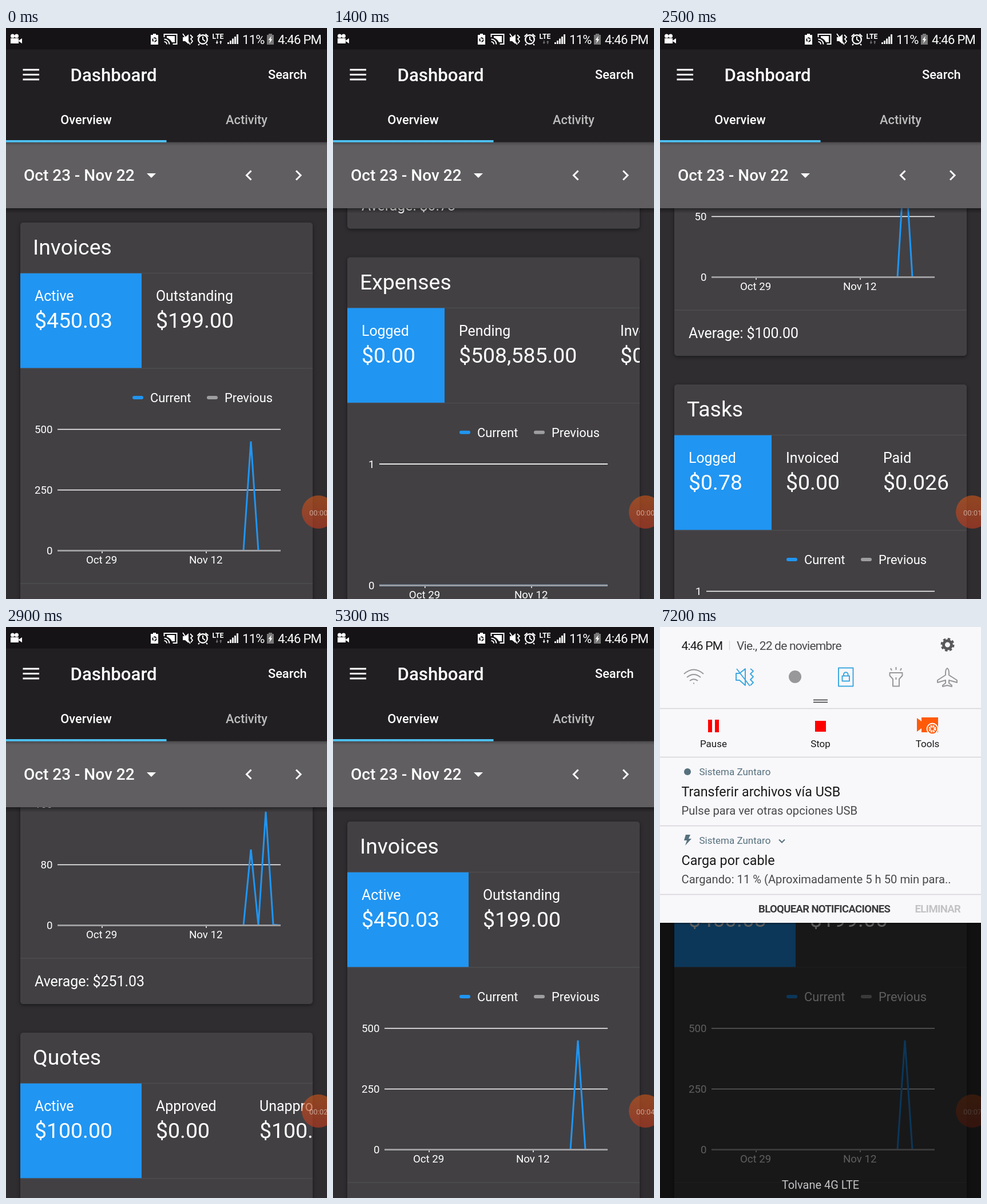
Write an HTML page that moves like this. It is 561 by 998 pixels and loops after 8 s.

```html
<!DOCTYPE html>
<html lang="en">
<meta charset="utf-8">
<title>Dashboard</title>
<style>
  html, body { margin: 0; width: 100%; height: 100%; overflow: hidden; background: #2f2e31 }
  svg { display: block }
  text { font-family: Roboto, sans-serif; fill: #fff }
  .medium { font-weight: 500 }
  .mid { text-anchor: middle }
  .end { text-anchor: end }
  .line { fill: none; stroke: #fff; stroke-width: 3 }
  .card { fill: #424043; filter: drop-shadow(0 2px 3px #0007) }
  .rule { stroke: #4d4c4f; stroke-width: 1.3 }
  .narrow { letter-spacing: -.7px }
  .icons { fill: none; stroke: #98979a; stroke-width: 2; stroke-linejoin: round }
  .icons .on { stroke: #3fa9e0 }
  #panel text { fill: #1a1a1a }
  #panel .app { fill: #56717d; font-size: 17px }
  #panel .head { font-size: 23.3px }
  #panel .info { fill: #49484b; font-size: 20.2px }
  #panel .button { font-size: 18.5px; font-weight: 700; letter-spacing: -.65px }
  .paper { fill: #f8f7fa }
  .split { stroke: #d5d4d7; stroke-width: 1.3 }
</style>
<svg id="stage" width="561" height="998" viewBox="0 0 561 998">
  <defs>
    <linearGradient id="shade" x2="0" y2="1">
      <stop stop-opacity=".4"/><stop offset="1" stop-opacity="0"/>
    </linearGradient>
    <linearGradient id="ember" x2="0" y2="1">
      <stop stop-color="#c0531a"/><stop offset="1" stop-color="#b53a22"/>
    </linearGradient>
    <clipPath id="window"><rect id="opening" width="561" height="467"/></clipPath>
  </defs>
  <rect width="561" height="998" fill="#2f2d30"/>
  <g id="list"></g>

  <!-- date bar -->
  <rect y="315" width="561" height="9" fill="url(#shade)"/>
  <rect y="199" width="561" height="116" fill="#605e61"/>
  <rect y="199" width="561" height="7" fill="url(#shade)" opacity=".6"/>
  <text class="medium" x="31" y="267" font-size="28">Oct 23 - Nov 22</text>
  <path d="M246 254h16l-8 8z" fill="#fff"/>
  <path class="line" d="M428.5 249.5l-8 8 8 8M507 249.5l8 8-8 8"/>

  <!-- app bar -->
  <rect width="561" height="199.5" fill="#211f22"/>
  <rect y="196" width="280.5" height="3.8" fill="#4fc3f7"/>
  <path class="line" d="M29.5 73H58M29.5 81.5H58M29.5 90H58"/>
  <text class="medium" x="112.5" y="92.5" font-size="31.2">Dashboard</text>
  <g class="medium" font-size="21.8">
    <text x="458" y="89">Search</text>
    <text class="mid" x="140" y="168">Overview</text>
    <text class="mid" x="420.5" y="168" opacity=".7">Activity</text>
  </g>

  <!-- status bar -->
  <rect width="561" height="37.5" fill="#151316"/>
  <g fill="#fff">
    <path d="M8 18h14v9H8zM22 22l6-4v9l-6-4z"/>
    <circle cx="11.5" cy="14" r="3.5"/><circle cx="18.5" cy="14" r="3.5"/>
    <path d="M253 12h4v-2h5v2h4v17h-13z"/>
    <circle cx="259.5" cy="20.5" r="3.2" fill="none" stroke="#151316" stroke-width="2" stroke-dasharray="5 1.7"/>
    <path d="M281 14h14v11h-5q-3-6-9-8z"/>
    <path d="M276.5 16v-5h22v17h-7M276.5 19.5a9 9 0 0 1 9 9M276.5 24a4.5 4.5 0 0 1 4.5 4.5" fill="none" stroke="#fff" stroke-width="2"/>
    <path d="M309 16h4l6-5v17l-6-5h-4z"/>
    <path d="M309 10l13 19M322 12l4 4-3 3 3 4-3 4" fill="none" stroke="#fff" stroke-width="1.8"/>
    <path d="M344 15v5l4 3M334.5 15l5-4.5M353.5 15l-5-4.5M338 28l-2 2M350 28l2 2" fill="none" stroke="#fff" stroke-width="2"/>
    <circle cx="344" cy="20" r="7.8" fill="none" stroke="#fff" stroke-width="2.4"/>
    <path id="arrows" d="M368 22h1.5v3h1.5l-2.3 3-2.2-3h1.5zM374.5 28h1.5v-3h1.5l-2.3-3-2.2 3h1.5z"/>
    <path d="M388.5 28v-3M392.5 28v-6M396.5 28v-9.5M400.5 28v-13M404.5 28v-17" stroke="#fff" stroke-width="2.8"/>
    <path d="M456 12h3v-2h6v2h3v17h-12z" fill="#777"/>
    <path d="M464 14l-5.5 7h3l-1.5 6 5.5-7.5h-3z"/>
  </g>
  <text x="360.5" y="19" font-size="12.2" font-weight="700">LTE</text>
  <g class="narrow" font-size="22"><text x="413" y="28">11%</text><text x="475" y="28">4:46 PM</text></g>

  <!-- recording timer -->
  <circle cx="546" cy="846" r="29" fill="url(#ember)" fill-opacity=".68"/>
  <text id="timer" x="530" y="851.5" font-size="13" opacity=".5"></text>

  <rect id="dim" width="561" height="998"/>
  <g id="panel">
    <text class="mid" x="280.5" y="982" font-size="20" style="fill:#c4c3c5">Tolvane 4G LTE</text>
    <g clip-path="url(#window)">
      <g id="notes">
        <rect class="paper" width="561" height="560"/>
        <circle cx="48" cy="253" r="6" fill="#56717d"/>
        <text class="app" x="68.5" y="259">Sistema Zuntaro</text>
        <text class="head" x="37.5" y="296">Transferir archivos vía USB</text>
        <text class="info" x="37.5" y="327.5">Pulse para ver otras opciones USB</text>
        <path class="split" d="M0 347.5h561"/>
        <path d="M45 363h8l-3 7h5l-11 12 3-9h-5z" fill="#56717d"/>
        <text class="app" x="68.5" y="379">Sistema Zuntaro</text>
        <path d="M208 371.5l5 5 5-5" fill="none" stroke="#56717d" stroke-width="2"/>
        <text class="head" x="37.5" y="416">Carga por cable</text>
        <text class="info" x="37.5" y="447.5">Cargando: 11 % (Aproximadamente 5 h 50 min para..</text>
      </g>
    </g>
    <g id="footer">
      <rect y="517" width="561" height="4" fill="url(#shade)"/>
      <rect class="paper" y="467" width="561" height="50"/>
      <path class="split" d="M0 467.5h561"/>
      <text class="button" x="172" y="499" style="fill:#3c3b3e">BLOQUEAR NOTIFICACIONES</text>
      <text class="button" x="445.5" y="499" style="fill:#c3c2c5">ELIMINAR</text>
    </g>
    <g id="header">
      <rect id="edge" y="227" width="561" height="6" fill="url(#shade)"/>
      <rect class="paper" width="561" height="227"/>
      <path class="split" d="M0 142.5h561M0 227.5h561M121.5 24v16"/>
      <g font-size="21" letter-spacing="-.8">
        <text x="37.5" y="40">4:46 PM</text>
        <text x="134" y="40" style="fill:#49484b">Vie., 22 de noviembre</text>
      </g>
      <g fill="none" stroke="#58575a">
        <circle cx="502.5" cy="31" r="7" stroke-width="5"/>
        <circle cx="502.5" cy="31" r="10.5" stroke-width="3" stroke-dasharray="4.5 3.747"/>
      </g>
      <g class="icons">
        <path d="M42 82q17-15 34 0M47 88q12-10 24 0M52 94q7-5.5 14 0M58 98.5h2"/>
        <path class="on" d="M133 81h6l10-8v29l-10-9h-6zM134 73l23 30M158 73l5 4-5 5 5 5-5 5 5 5-5 5"/>
        <circle cx="236" cy="87" r="11" fill="#98979a" stroke="none"/>
        <path class="on" d="M312 71.5h25.5v32H312zM318.5 85.5h12.5v9h-12.5zM321 85v-2a3.8 3.8 0 0 1 7.6 0v2"/>
        <path d="M401.5 80h22v5l-5.5 6v12.5h-11V91l-5.5-6zM412.5 70v5M403 72l2 4M422 72l-2 4M412.5 88v4"/>
        <path d="M502 72q-3 2-3 8v4l-14 9v4l14-4v5l-5 4v2l8-2 8 2v-2l-5-4v-5l14 4v-4l-14-9v-4q0-6-3-8z"/>
        <path d="M268 127.500h25M268 131.500h25" stroke="#333" stroke-width="1.5"/>
      </g>
      <path d="M84 162h7v22h-7zM96 162h7v22h-7zM271 164h19v19h-19z" fill="red"/>
      <path d="M449 159l8 6v-7h29v26h-29v-7l-8 6z" fill="#ff5a0a"/>
      <circle cx="476" cy="178" r="9.5" fill="#ff5a0a" stroke="#fff" stroke-width="1.8"/>
      <circle cx="476" cy="178" r="4.5" fill="none" stroke="#fff" stroke-width="4" stroke-dasharray="2.4 1.134"/>
      <g class="mid" font-size="17">
        <text x="93.5" y="210">Pause</text><text x="280.5" y="210">Stop</text><text x="467.5" y="210">Tools</text>
      </g>
    </g>
  </g>
</svg>
<script>
const $ = id => document.getElementById(id);
const clamp = v => Math.max(0, Math.min(1, v));
const text = (x, y, size, str, cls = '') =>
  `<text x="${x}" y="${y}" font-size="${size}" class="${cls}">${str}</text>`;
const rule = y => `<path class="rule" d="M25 ${y}h511"/>`;

// tiles: [left, label, amount]; peaks: [day, share of the top grid line]; born: start of the chart's entrance
const cards = [
  { name: 'Invoices', average: '$450.03', axis: ['500', '250'], peaks: [[26, .9]],
    tiles: [[25, 'Active', '$450.03'], [237, 'Outstanding', '$199.00']] },
  { name: 'Payments', average: '$251.03', axis: ['160', '80'], peaks: [[26, .625], [28, .9375], [29, .006]],
    tiles: [[25, 'Active', '$251.03'], [237, 'Refunded', '$0.00']] },
  { name: 'Quotes', average: '$100.00', axis: ['100', '50'], peaks: [[26, 1]], born: 760,
    tiles: [[25, 'Active', '$100.00'], [237, 'Approved', '$0.00'], [418, 'Unapproved', '$100.00']] },
  { name: 'Tasks', average: '$0.78', axis: ['1'], left: 81, peaks: [[28, .59], [29, .19]], born: 1000,
    tiles: [[25, 'Logged', '$0.78'], [195, 'Invoiced', '$0.00'], [365, 'Paid', '$0.026']] },
  { name: 'Expenses', average: '$0.00', axis: ['1'], left: 81, peaks: [],
    tiles: [[25, 'Logged', '$0.00'], [195, 'Pending', '$508,585.00'], [477, 'Invoiced', '$0.00']] },
];

function cardMarkup({ name, average, axis, tiles, left = 90 }, i) {
  const dayX = day => left + day * (480 - left) / 30;
  const grid = [...axis, '0'].map((label, k) => {
    const y = 361.5 + 212 * k / axis.length;
    return `<path d="M${left} ${y}H480" stroke="#fff" stroke-width="1.6"/>` + text(left - 8.5, y + 6.5, 18.7, label, 'end');
  }).join('');
  const dates = [[6, 'Oct 29'], [20, 'Nov 12']].map(([day, label]) =>
    `<path d="M${dayX(day)} 573v5" stroke="#fff" stroke-width="1.5"/>` + text(dayX(day) - .8, 596, 18.7, label, 'mid')).join('');
  const labels = tiles.map(([x, label, amount]) =>
    text(x + 25, 137, 24.9, label) + text(x + 25, 184, 37.4, amount)).join('');
  return `<g transform="translate(0 ${340 + 761 * i})">
    <rect class="card" x="25" width="511" height="711" rx="5"/>
    ${text(47, 56.2, 37.4, name)}${rule(88.5)}${rule(255)}${rule(631)}
    <rect x="25" y="88.8" width="${tiles[1][0] - 25}" height="165.4" fill="#2095f2"/>
    <svg width="536" height="255">${labels}</svg>
    <rect x="221" y="303" width="19" height="6" rx="3" fill="#2095f2"/>${text(252, 314, 21.8, 'Current')}
    <rect x="351" y="303" width="19" height="6" rx="3" fill="#9e9d9f"/>${text(382, 314, 21.8, 'Previous')}
    ${grid}${dates}
    <svg width="536" height="581.5" fill="none" stroke-width="3">
      <path id="current${i}" stroke="#2095f2"/><path id="previous${i}" stroke="#9e9d9f"/>
    </svg>
    ${text(50, 679.5, 24.9, 'Average: ' + average)}
  </g>`;
}
$('list').innerHTML = cards.map(cardMarkup).join('');

function drawChart({ peaks, left = 90, born = -300 }, i, t) {
  const grown = clamp((t - born) / 300);
  const base = 573.5 + 56 * (1 - grown);
  const shares = Object.fromEntries(peaks);
  const points = Array.from({ length: 31 }, (_, day) =>
    [left + day * (480 - left) / 30, base - 212 * grown * (shares[day] || 0)]);
  $('current' + i).setAttribute('d', 'M' + points.join('L'));
  $('previous' + i).setAttribute('d', `M${left} ${base}H480`);
}

// linear interpolation through [time, value] stops
function track(stops, t) {
  const k = stops.findIndex(s => s[0] > t);
  if (k < 0) return stops[stops.length - 1][1];
  if (k === 0) return stops[0][1];
  const [[t0, a], [t1, b]] = [stops[k - 1], stops[k]];
  return a + (b - a) * (t - t0) / (t1 - t0);
}
const scroll = [[100, 0], [200, 60], [400, 420], [500, 420], [900, 1807], [1200, 2750], [1500, 3100],
  [1700, 3122], [1800, 3090], [2100, 2718.5], [2500, 2000], [2900, 1153], [3200, 0]];
const pull = [[5500, 0], [5600, 170], [5700, 299], [5800, 400], [5900, 465], [6000, 500], [6100, 517]];

const shift = (id, y) => $(id).setAttribute('transform', `translate(0 ${y})`);

function render(t) {
  shift('list', -track(scroll, t));
  cards.forEach((card, i) => drawChart(card, i, t));
  $('timer').textContent = '00:0' + Math.max(0, Math.floor(t / 900) - 1);
  $('arrows').setAttribute('fill', t < 200 || t >= 5300 ? '#fff' : '#777');

  const height = track(pull, t);
  $('panel').style.display = height ? '' : 'none';
  $('dim').setAttribute('opacity', .63 * (height / 517) ** .4);
  $('opening').setAttribute('height', Math.max(0, height - 50));
  shift('notes', (height - 517) * .33);
  shift('footer', height - 517);
  shift('header', Math.min(0, height - 227));
  $('edge').setAttribute('opacity', height < 517 ? .7 : 0);
}

function loop(now) {
  render(Math.floor(now % 8000 / 100) * 100);
  requestAnimationFrame(loop);
}
render(0);
requestAnimationFrame(loop);
</script>
</html>
```
